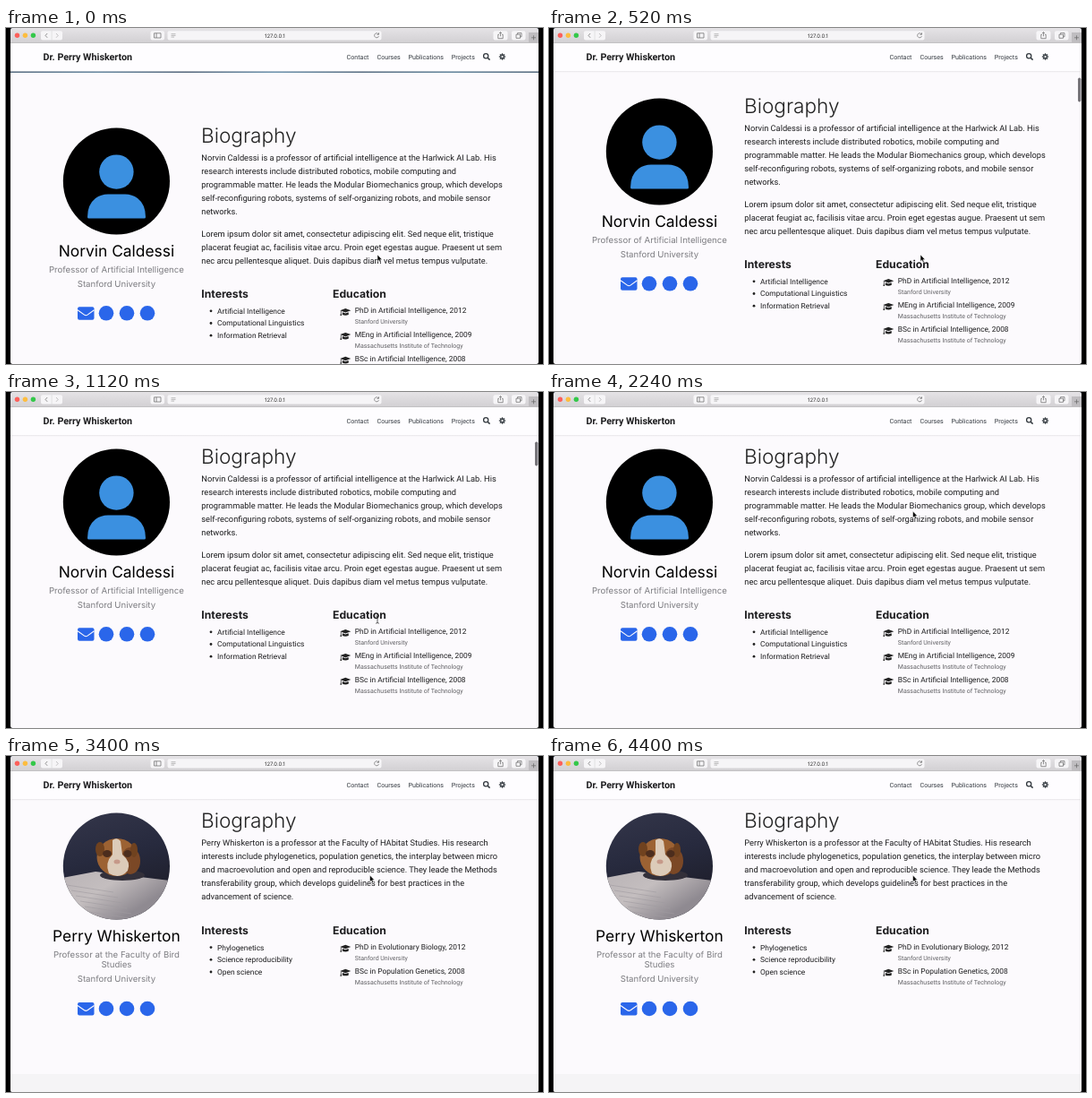
Animation, 600 px wide and 375 px high, one loop 4520 ms. Source, as an HTML page:

```html
<!DOCTYPE html>
<html lang="en">
<head>
<meta charset="utf-8">
<title>Biography page</title>
<style>
html, body { margin: 0; width: 100%; height: 100%; overflow: hidden; background: #000; }
svg { display: block; width: 600px; height: 375px; }
text { font-family: Roboto, sans-serif; fill: #1c1c1e; text-rendering: geometricPrecision; font-optical-sizing: none; white-space: pre; }
.brand { font-size: 10.75px; font-weight: 700; }
.nav { font-size: 7.15px; fill: #343a40; }
.url { font: 6px Inter, sans-serif; fill: #333; text-anchor: middle; }
.title { font: 300 22.6px Inter, sans-serif; fill: #222; }
.head { font: 700 12.2px Inter, sans-serif; }
.name { font: 17.4px Inter, sans-serif; fill: #000; text-anchor: middle; }
.role { font: 9.65px Inter, sans-serif; fill: #7c7c80; text-anchor: middle; }
.body { font-size: 9.28px; }
.item { font-size: 8.4px; }
.small { font-size: 7px; fill: #606064; }
.line { fill: none; stroke: #666; stroke-width: .7; }
</style>
</head>
<body>
<svg id="stage" viewBox="0 0 600 375"></svg>
<script>
const BLUE = '#2a66ea', MID = 123.4;

const text = (cls, x, y, s) => `<text class="${cls}" x="${x}" y="${y}">${s}</text>`;
const lines = (cls, x, y, step, list) => list.map((s, i) => text(cls, x, y + i * step, s)).join('');
const rect = (x, y, w, h, fill, r = 0) => `<rect x="${x}" y="${y}" width="${w}" height="${h}" rx="${r}" fill="${fill}"/>`;
const dot = (x, y, r, fill) => `<circle cx="${x}" cy="${y}" r="${r}" fill="${fill}"/>`;
const oval = (x, y, rx, ry, fill) => `<ellipse cx="${x}" cy="${y}" rx="${rx}" ry="${ry}" fill="${fill}"/>`;
const path = (d, fill) => `<path d="${d}" fill="${fill}"/>`;
const stroke = d => `<path class="line" d="${d}"/>`;

const contacts = y => rect(80, y - 7, 18.5, 14.5, BLUE, 2)
  + `<path d="M80 ${y - 3.5}L87.5 ${y + 1.8}Q89.2 ${y + 3} 91 ${y + 1.8}L98.5 ${y - 3.5}" fill="none" stroke="#fcfafd" stroke-width="1.1"/>`
  + [112, 135, 158].map(x => dot(x, y, 8.3, BLUE)).join('');

const cap = y => `<g transform="translate(379.3 ${y})">`
  + path('M-6 -1.8L0 -4L6 -1.8L0 .5Z', '#222')
  + path('M-3.3 .2L0 1.4L3.3 .2L3.6 2.7Q0 4.6 -3.6 2.7Z', '#222')
  + path('M-5.4 -1.2H-4.7V1.4L-4.2 4H-5.9L-5.4 1.4Z', '#222') + '</g>';

const interests = (y, list) => text('head', 218.3, y, 'Interests')
  + list.map((s, i) => dot(229, y + 14.6 + i * 13.7, 1.4, '#222') + text('item', 236, y + 17.5 + i * 13.7, s)).join('');

const education = (y, list) => text('head', 365, y, 'Education')
  + list.map(([degree, school], i) => {
    const top = y + 17.2 + i * 26.9;
    return cap(top - 1.4) + text('item', 389.8, top, degree) + text('small', 389.8, top + 11.8, school);
  }).join('');

const STANFORD = 'Stanford University', MIT = 'Massachusetts Institute of Technology';

const biography = list => text('title', 218, 79.6, 'Biography') + lines('body', 218.3, 100.3, 14.97, list);

const silhouette = dot(MID, 123, 59.6, '#000') + dot(MID, 112.6, 19.2, '#3b90e0')
  + path('M91 163Q91 149 100 142Q106 137.4 114 137.4H133Q141 137.4 147 142Q156 149 156 163Q156 164.6 154.4 164.6H92.6Q91 164.6 91 163Z', '#3b90e0');

const photo = `<g clip-path="url(#round)">`
  + rect(63, 63, 121, 121, 'url(#wall)')
  + path('M63 136L100 129L184 139V184H63Z', 'url(#paper)')
  + [0, 1, 2, 3, 4, 5].map(i => `<path d="M${68 + i * 5} ${144 + i * 6}l52 8" stroke="#a09aa0" stroke-width=".6"/>`).join('')
  + oval(130, 133, 25, 6, '#33303a')
  + oval(124, 113, 22.5, 21, '#9c6233') + oval(139, 117, 11, 15, '#7b4826')
  + oval(105, 104, 5, 8, '#70421f') + oval(143, 105, 4, 8, '#70421f')
  + path('M119 94Q124 90 128 95L130 110Q140 118 136 128Q127 138 115 131Q110 119 119 110Z', '#dccbb9')
  + oval(113, 109, 5, 4, '#4c2d1d') + oval(136, 109, 4.5, 4, '#4c2d1d')
  + oval(124, 118, 3.5, 2.5, '#c69989') + '</g>';

const before = silhouette + text('name', MID, 207.2, 'Norvin Caldessi')
  + lines('role', MID, 225, 15.9, ['Professor of Artificial Intelligence', STANFORD])
  + contacts(270.3)
  + biography([
    'Norvin Caldessi is a professor of artificial intelligence at the Harlwick AI Lab. His',
    'research interests include distributed robotics, mobile computing and',
    'programmable matter. He leads the Modular Biomechanics group, which develops',
    'self-reconfiguring robots, systems of self-organizing robots, and mobile sensor',
    'networks.'])
  + lines('body', 218.3, 184.8, 14.97, [
    'Lorem ipsum dolor sit amet, consectetur adipiscing elit. Sed neque elit, tristique',
    'placerat feugiat ac, facilisis vitae arcu. Proin eget egestas augue. Praesent ut sem',
    'nec arcu pellentesque aliquet. Duis dapibus diam vel metus tempus vulputate.'])
  + interests(253.2, ['Artificial Intelligence', 'Computational Linguistics', 'Information Retrieval'])
  + education(253.2, [
    ['PhD in Artificial Intelligence, 2012', STANFORD],
    ['MEng in Artificial Intelligence, 2009', MIT],
    ['BSc in Artificial Intelligence, 2008', MIT]]);

const after = photo + text('name', MID, 207.2, 'Perry Whiskerton')
  + lines('role', MID, 225, 11.3, ['Professor at the Faculty of Bird', 'Studies'])
  + text('role', MID, 252.2, STANFORD)
  + contacts(282)
  + biography([
    'Perry Whiskerton is a professor at the Faculty of HAbitat Studies. His research',
    'interests include phylogenetics, population genetics, the interplay between micro',
    'and macroevolution and open and reproducible science. They leade the Methods',
    'transferability group, which develops guidelines for best practices in the',
    'advancement of science.'])
  + interests(199, ['Phylogenetics', 'Science reproducibility', 'Open science'])
  + education(199, [
    ['PhD in Evolutionary Biology, 2012', STANFORD],
    ['BSc in Population Genetics, 2008', MIT]])
  + rect(5, 355, 590, 20, '#f5f4f6');

const gear = Array.from({length: 8}, (_, i) =>
  `<path d="M554.5 28.3V31" stroke="#343a40" stroke-width="1.1" transform="rotate(${i * 45} 554.5 32)"/>`).join('')
  + '<circle cx="554.5" cy="32" r="2.5" fill="none" stroke="#343a40" stroke-width=".9"/>';

const navbar = rect(5, 47.5, 590, 3, 'url(#shade)') + rect(5, 16, 590, 32, '#fefdff')
  + text('brand', 41.6, 36, 'Dr. Perry Whiskerton')
  + [['Contact', 380.5], ['Courses', 414.5], ['Publications', 449.6], ['Projects', 497.7]]
    .map(([s, x]) => text('nav', x, 34.6, s)).join('')
  + '<circle cx="536.2" cy="31.2" r="2.6" fill="none" stroke="#343a40" stroke-width="1.3"/>'
  + '<path d="M538.2 33.2L540.6 35.6" stroke="#343a40" stroke-width="1.6"/>' + gear;

const toolbar = rect(5, 0, 590, 16.5, 'url(#chrome)') + rect(5, 16, 590, .6, '#aaa8ab')
  + dot(12.5, 8.3, 2.7, '#fc605b') + dot(21.4, 8.3, 2.7, '#fdbd3f') + dot(30.4, 8.3, 2.7, '#34c84a')
  + [[39, 24], [161.5, 15.5], [180.5, 239], [544.5, 16], [565, 15.5]].map(([x, w]) => rect(x, 3.2, w, 10.3, '#f6f5f7', 2)).join('')
  + rect(50.8, 3.2, .5, 10.3, '#ccc')
  + stroke('M46.2 6L44 8.4L46.2 10.8') + `<g opacity=".5">${stroke('M56 6L58.2 8.4L56 10.8')}</g>`
  + stroke('M165.5 5.8H173V11H165.5ZM168 5.8V11')
  + `<g opacity=".6">${stroke('M184.5 6.7H189.5M184.5 8.4H189.5M184.5 10.1H188')}</g>`
  + text('url', 300.4, 10.5, '127.0.0.1')
  + stroke('M416.3 7A2.5 2.5 0 1 0 416.5 9.2M416.5 5.3V7.3H414.5')
  + stroke('M551 7.3H549.8V11.7H555.2V7.3H554M552.5 9.3V4.8M551 6L552.5 4.6L554 6')
  + stroke('M570 7.2H574.5V11.3H570ZM571.5 7V5.6H576V9.8H574.7')
  + rect(584, 5, 11, 11.3, '#bfbdc0') + stroke('M589.5 8.3V13.3M587 10.8H592');

const gradient = (id, angle, ...stops) => `<linearGradient id="${id}" gradientTransform="rotate(${angle})">`
  + stops.map((c, i) => `<stop offset="${i / (stops.length - 1)}" stop-color="${c}"/>`).join('') + '</linearGradient>';

stage.innerHTML = '<defs>'
  + gradient('chrome', 90, '#e5e3e6', '#d2d0d3')
  + gradient('shade', 90, '#d9d7db', '#fcfafd00')
  + gradient('hero', 0, '#12324e', '#285a7c', '#102b48', '#316b91', '#13334f', '#245878', '#10304b')
  + gradient('wall', 75, '#34364a', '#272a3e', '#1d1d28')
  + gradient('paper', 35, '#b9b3b6', '#c4bebf', '#8f8a91')
  + `<clipPath id="round"><circle cx="${MID}" cy="123" r="59.6"/></clipPath>`
  + '<clipPath id="window"><rect x="5" width="590" height="375" rx="2.5"/></clipPath></defs>'
  + '<g clip-path="url(#window)">'
  + rect(5, 0, 590, 375, '#fcfafd')
  + `<g id="page">${rect(5, -60, 590, 62, 'url(#hero)')}<g id="old">${before}</g><g id="fresh">${after}</g></g>`
  + navbar + toolbar
  + `<g id="bar">${rect(591, 55.5, 3.4, 27, '#77757a', 1.7)}</g></g>`
  + '<g id="pointer"><path id="arrow" d="M0 0V7.4L1.7 5.9L2.8 8.5L4.1 7.9L3 5.4H5.2Z" fill="#000" stroke="#fff" stroke-width=".5"/>'
  + '<path id="beam" d="M-1.8 -3.2Q0 -3.2 0 -2V4Q0 5.2 -1.8 5.2M1.8 -3.2Q0 -3.2 0 -2M0 4Q0 5.2 1.8 5.2" fill="none" stroke="#333" stroke-width=".8"/></g>';

const span = (t, a, b) => Math.min(1, Math.max(0, (t - a) / (b - a)));
const smooth = x => x * x * (3 - 2 * x);
const show = (el, on) => el.setAttribute('visibility', on ? 'visible' : 'hidden');
const move = (el, x, y) => el.setAttribute('transform', `translate(${x} ${y})`);

function draw(now) {
  const t = Math.floor(now % 4520 / 40) * 40;
  move(page, 0, 48 - 33 * smooth(span(t, 80, 520)) - 15 * smooth(span(t, 560, 1000)));

  const reloaded = t >= 2760;
  show(old, !reloaded);
  show(fresh, reloaded);

  const first = span(t, 40, 120) - span(t, 1720, 1920);
  const second = span(t, 2800, 2880) - span(t, 3200, 3360);
  bar.setAttribute('opacity', first + second);

  const k = smooth(span(t, 1200, 1760));
  move(pointer, 415 - 8.5 * k, 253 - 120 * k);
  const overText = t >= 800 && t < 1240;
  show(beam, overText);
  show(arrow, !overText);
}

const start = performance.now();
(function tick() {
  draw(performance.now() - start);
  requestAnimationFrame(tick);
})();
</script>
</body>
</html>
```
